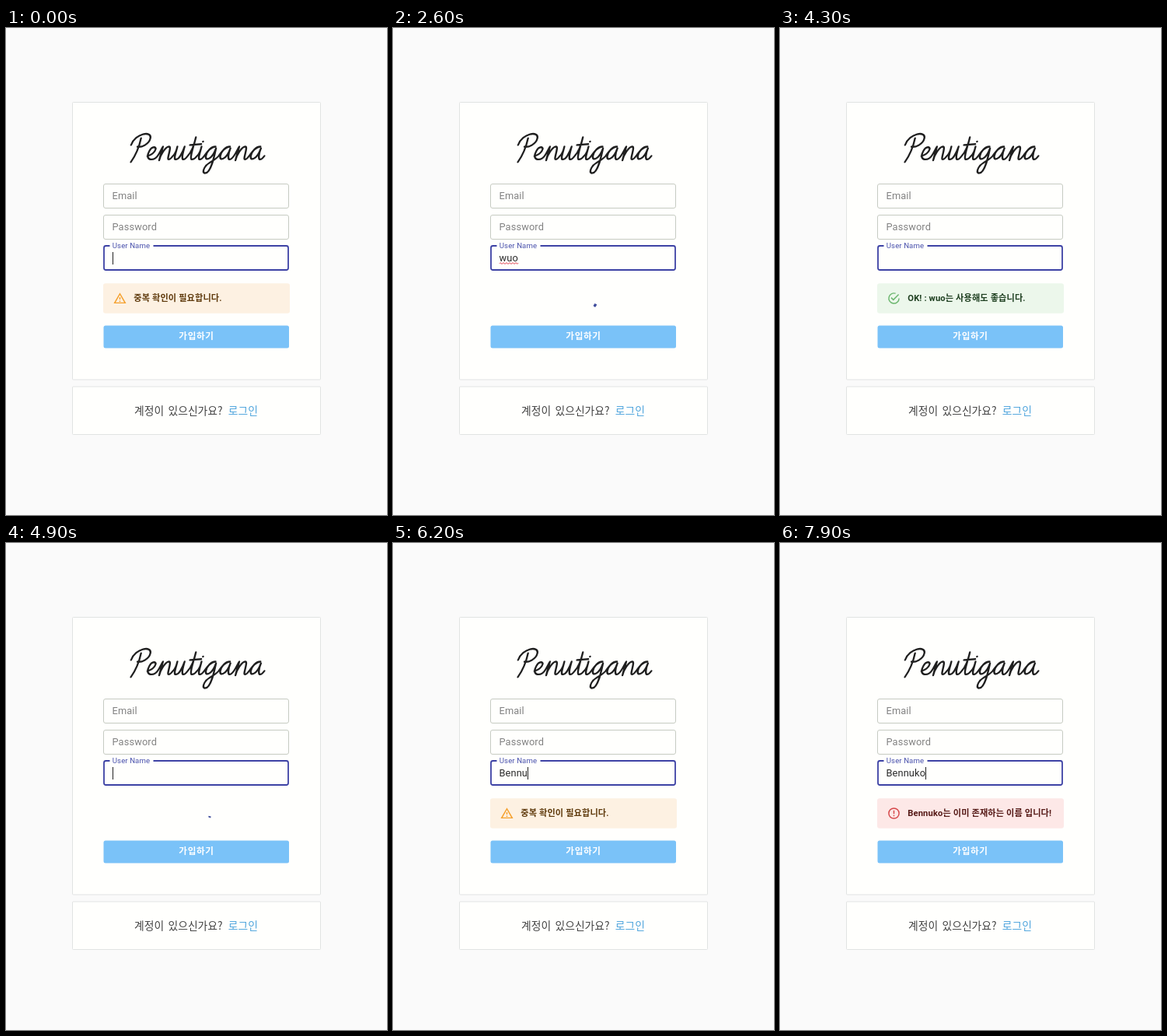
Recreate the animation shown at these times as an HTML page. Size 490 by 626 pixels, loop 8 s.

```html
<!DOCTYPE html>
<html lang="ko">
<head>
<meta charset="utf-8">
<title>Sign up</title>
<style>
  html, body { margin: 0; width: 100%; height: 100%; overflow: hidden; background: #fafafa; }
  svg { display: block; width: 490px; height: 626px; }
  text { font-family: Roboto, "Noto Sans CJK KR", "Noto Sans CJK", sans-serif; white-space: pre; }
  .card { fill: #fffffd; stroke: #e1e3e3; }
  .field { fill: none; stroke: #c6cbc2; }
  .input { font-size: 12.8px; letter-spacing: .12px; fill: #2b2b2b; }
  .hint { fill: #828282; }
  .label { font-size: 9.6px; letter-spacing: .09px; fill: #4a52ad; }
  .msg { font-size: 11.2px; font-weight: 700; letter-spacing: .12px; }
  .submit { font-size: 11.6px; font-weight: 700; letter-spacing: .7px; fill: #fff; text-anchor: middle; }
  .foot { font-family: "Noto Sans CJK KR", "Noto Sans CJK", sans-serif; font-size: 13.8px; fill: #404040; }
  .link { fill: #4fa5dd; font-weight: 500; letter-spacing: .15px; }
  .line { fill: none; stroke-linecap: round; stroke-linejoin: round; }
</style>
</head>
<body>
<svg viewBox="0 0 490 626">
  <rect width="490" height="626" fill="#fafafa"/>
  <rect class="card" x="85.5" y="95.5" width="319" height="356.5" rx="1"/>
  <rect class="card" x="85.5" y="461" width="319" height="61.5" rx="1"/>

  <path id="title" class="line" role="img" stroke="#1f1f1f" stroke-width="2.2"
        transform="translate(160 170) skewX(-12) scale(1.09)"/>

  <rect class="field" x="125.5" y="200.5" width="238" height="31" rx="2.5"/>
  <text class="input hint" x="136.5" y="220.3">Email</text>
  <rect class="field" x="125.5" y="240.5" width="238" height="31" rx="2.5"/>
  <text class="input hint" x="136.5" y="260.3">Password</text>

  <rect x="126" y="280" width="237" height="31" rx="2.5" fill="none" stroke="#3d42a5" stroke-width="1.8"/>
  <rect x="133.5" y="278" width="56" height="4" fill="#fffffd"/>
  <text class="label" x="136.8" y="283.3">User Name</text>
  <text id="value" class="input" x="136.5" y="300.3"></text>
  <path id="squiggle" class="line" stroke="#e2414f" stroke-width="1"/>
  <rect id="caret" y="288" width="1" height="16" fill="#222"/>

  <g id="alert">
    <rect id="alertBox" x="125" y="328.2" width="240" height="38.6" rx="3"/>
    <path id="icon" transform="translate(137.7 338.7) scale(.733)"/>
    <text id="msg" class="msg" x="164.3" y="351"></text>
  </g>
  <g id="spinner" fill="none" stroke="#3f4c9c" stroke-width="3.6">
    <circle id="arc" r="20.2"/>
  </g>

  <rect x="125.5" y="382.6" width="238.5" height="28.8" rx="2.5" fill="#7ac2f8"/>
  <text class="submit" x="245" y="400.4">가입하기</text>

  <text class="foot" x="165" y="496.8">계정이</text>
  <text class="foot" x="208.5" y="496.8">있으신가요?</text>
  <text class="foot link" x="285.7" y="496.8">로그인</text>
</svg>
<script>
const LOOP = 8000, BLINK = 530, SPIN = 1400;
const $ = id => document.getElementById(id);
const set = (el, attrs) => { for (const k in attrs) el.setAttribute(k, attrs[k]); };
const show = (el, on) => el.setAttribute('visibility', on ? 'visible' : 'hidden');

// Joined handwriting: each letter continues from the pen position of the last one.
const bowl = 'c3 -6 6 -11 11 -11c-6 0 -9 6 -9 11c0 6 8 5 10 -9';
const tail = 'c2 0 3 -2 4 -4';
const stem = 'c2 -2 3 -6 3 -11c0 6 -2 15 1.5 15';
const letters = {
  P: 'M7 -26c0 10 -2 20 -6 28m-4 -20c2 -14 21 -17 21 -8c0 7 -8 11 -13 10m14 11',
  e: 'c4 -1 8 -4 8 -8c0 -3 -5 -4 -7 2c-2 6 0 10 5 10c3 0 5 -2 6 -4',
  n: 'c2 -4 3 -9 4 -11c0 5 -1 10 -1 16c0 -6 4 -16 8 -16c4 0 0 15 3 15' + tail,
  u: stem + 's6 -8 7 -15c-.5 7 -1 15 2 15' + tail,
  t: 'c3 -4 5 -13 5 -22c0 8 -3 26 1 26c2 0 4 -2 5 -4m-11 -13l13 -1m-2 14',
  i: stem + tail + 'm-5 -17l.1 0m4.9 17',
  g: bowl + 'c0 10 0 28 -6 29c-5 1 -4 -8 2 -12c4 -3 7 -5 9 -8',
  a: bowl + 'c-1 5 -1 13 2 13' + tail
};
const brand = 'Penutigana';
set($('title'), { d: [...brand].map(c => letters[c]).join(''), 'aria-label': brand });

const alerts = {
  warning: {
    box: '#fdf1e2', ink: '#5f3a0c', tint: '#f5a02c', text: '중복 확인이 필요합니다.',
    icon: 'M12 5.99L19.53 19H4.47L12 5.99M12 2L1 21h22L12 2zm1 14h-2v2h2v-2zm0-6h-2v4h2v-4z'
  },
  success: {
    box: '#ecf7eb', ink: '#1e3f20', tint: '#6cb76f', text: 'OK! : wuo는 사용해도 좋습니다.',
    icon: 'M20 12A8 8 0 1 1 14.2 4.31L15.77 2.74A10 10 0 1 0 22 12zM7.91 10.08L6.5 11.5 11 16 21 6 19.59 4.58 11 13.17z'
  },
  error: {
    box: '#fde8e7', ink: '#561a17', tint: '#d6474a', text: 'Bennuko는 이미 존재하는 이름 입니다!',
    icon: 'M11 15h2v2h-2zm0-8h2v6h-2zM12 2a10 10 0 1 0 0 20a10 10 0 1 0 0-20zm0 18a8 8 0 1 1 0-16a8 8 0 1 1 0 16z'
  }
};

// [time, value]; the caret blink restarts with every key.
const keys = [
  [-60, ''], [1300, 'w'], [1400, 'wu'], [1570, 'wuo'], [3700, 'wu'], [3770, ''],
  [5500, 'B'], [5600, 'Be'], [5800, 'Ben'], [6000, 'Benn'], [6200, 'Bennu'],
  [6300, 'Bennuk'], [6400, 'Bennuko']
];
const states = [
  [0, 'warning'], [2505, 'busy'], [3250, 'success'],
  [4848, 'busy'], [5480, 'warning'], [7305, 'busy'], [7800, 'error']
];
const latest = (list, t) => list.findLast(item => item[0] <= t);
const lerp = (a, b, k) => a + (b - a) * k;

// cubic-bezier(.42, 0, .58, 1)
function ease(x) {
  let lo = 0, hi = 1;
  for (let i = 0; i < 20; i++) {
    const s = (lo + hi) / 2, r = 1 - s;
    if (1.26 * r * r * s + 1.74 * r * s * s + s ** 3 < x) lo = s; else hi = s;
  }
  return lo * lo * (3 - 2 * lo);
}

function drawSpinner(age) {
  const p = age % SPIN / SPIN;
  const k = ease(p * 2 % 1), first = p < .5;
  set($('spinner'), { transform: `translate(245 347) scale(.873) rotate(${p * 360})` });
  set($('arc'), {
    'stroke-dasharray': `${first ? lerp(1, 100, k) : 100} 200`,
    'stroke-dashoffset': first ? lerp(0, -15, k) : lerp(-15, -125, k)
  });
}

function drawAlert({ box, ink, tint, text, icon }) {
  set($('alertBox'), { fill: box });
  set($('icon'), { fill: tint, d: icon });
  set($('msg'), { fill: ink });
  $('msg').textContent = text;
}

function draw(t) {
  const [keyTime, text] = latest(keys, t);
  const value = $('value');
  value.textContent = text;
  const width = text ? value.getComputedTextLength() : 0;
  set($('caret'), { x: Math.round(136.6 + width) });
  show($('caret'), Math.floor((t - keyTime) / BLINK) % 2 === 0);

  const misspelt = text === 'wuo' && t >= 2250;
  show($('squiggle'), misspelt);
  if (misspelt) set($('squiggle'), { d: 'M137 302.5' + 'q1 -1.8 2 0t2 0'.repeat(Math.round(width / 4)) });

  const [since, state] = latest(states, t);
  const busy = state === 'busy';
  show($('spinner'), busy);
  show($('alert'), !busy);
  if (busy) drawSpinner(t - since); else drawAlert(alerts[state]);
}

let start;
function tick(now) {
  start ??= now;
  draw((now - start) % LOOP);
  requestAnimationFrame(tick);
}
draw(0);
requestAnimationFrame(tick);
</script>
</body>
</html>
```
